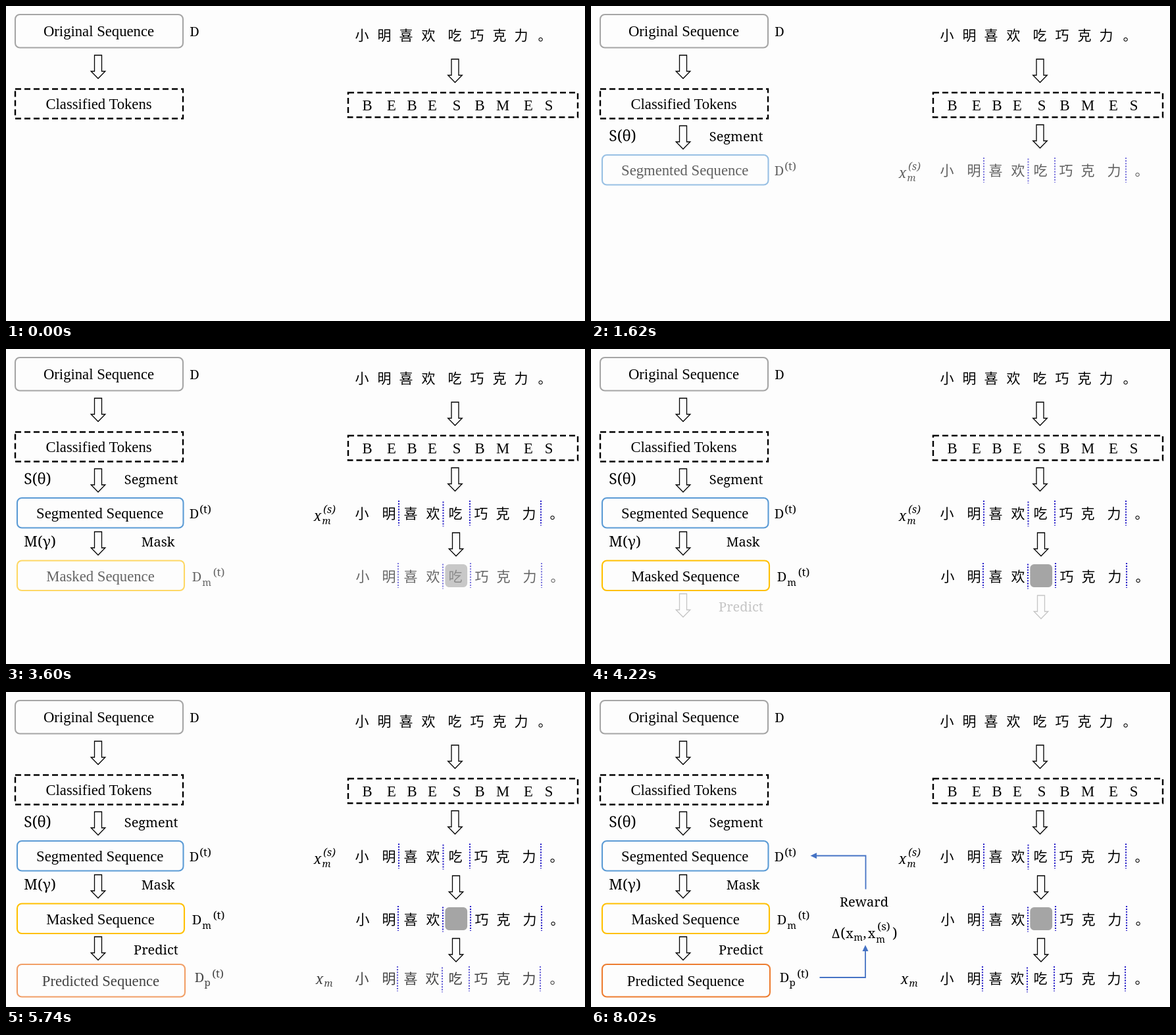
Recreate the animation shown at these times as an HTML page. Size 880 by 480 pixels, loop 8.05 s.

```html
<!DOCTYPE html>
<html lang="en">
<head>
<meta charset="utf-8">
<title>Segment, mask and predict</title>
<style>
  html, body { margin: 0; width: 880px; height: 480px; overflow: hidden; background: #fdfdfd; }
  svg { display: block; }
  text { text-anchor: middle; fill: #000; }
  .label { font: 22.7px "Liberation Serif", "Times New Roman", serif; }
  .math { font: 20px "Noto Serif", Cambria, serif; }
  .han { font: 300 21px "Noto Sans CJK SC", "Noto Sans CJK", sans-serif; }
  .arrow { fill: #fdfdfd; stroke: #000; stroke-width: 1.3; }
  .dash { fill: none; stroke: #000; stroke-width: 2.4; stroke-dasharray: 9 5; }
  .cut { stroke: #2a22c8; stroke-width: 2.1; stroke-dasharray: 2.06 2.06; }
  .wire { fill: none; stroke: #4472c4; stroke-width: 1.8; }
  .tip { fill: #4472c4; }
</style>
</head>
<body>
<svg id="stage" width="880" height="480" viewBox="0 0 880 480"></svg>
<script>
const LOOP = 8050;
const FADE = 1000;
const stage = document.getElementById("stage");

function add(parent, tag, attrs, content) {
  const el = document.createElementNS("http://www.w3.org/2000/svg", tag);
  for (const key in attrs) el.setAttribute(key, attrs[key]);
  if (content) el.textContent = content;
  return parent.appendChild(el);
}

function text(parent, kind, x, y, content, size, italic) {
  const el = add(parent, "text", { class: kind, x, y }, content);
  if (size) el.style.fontSize = size + "px";
  if (italic) el.style.fontStyle = "italic";
}

const math = (g, x, y, content, size, italic) => text(g, "math", x, y, content, size, italic);

function box(g, x, y, width, height, stroke, title, baseline) {
  add(g, "rect", { x, y, width, height, rx: 7, fill: "#fdfdfd", stroke, "stroke-width": 2.1 });
  text(g, "label", x + width / 2 - 0.5, baseline, title);
}

function arrow(g, x, y) {
  add(g, "path", {
    class: "arrow",
    d: `M${x - 5.5} ${y}h11v24.5h5.3l-10.8 11l-10.8 -11h5.3z`
  });
}

function sentence(g, baseline, xs) {
  [..."小明喜欢吃巧克力。"].forEach((c, i) => text(g, "han", xs[i], baseline, c));
}

function cuts(g, y, xs) {
  xs.forEach((x, i) => {
    const top = y + (i === 1 ? 1.5 : 0);
    add(g, "line", { class: "cut", x1: x, y1: top, x2: x, y2: top + 38 });
  });
}

// Always visible
const base = add(stage, "g");
box(base, 14, 13, 255, 50.5, "#a5a5a5", "Original Sequence", 46);
math(base, 286.5, 46, "D");
arrow(base, 140, 75);
add(base, "rect", { class: "dash", x: 14, y: 126.5, width: 255, height: 45 });
text(base, "label", 141, 157, "Classified Tokens");
sentence(base, 52, [541, 575, 608, 642, 682, 716, 750, 783, 819]);
arrow(base, 682.5, 81);
add(base, "rect", { class: "dash", x: 520, y: 132, width: 349, height: 37.5 });
const tagX = [549, 586, 617, 648, 685, 720, 755, 794, 825];
[..."BEBESBMES"].forEach((c, i) => text(base, "label", tagX[i], 159, c));

// Each step fades in after the one before it
const steps = [
  g => {
    math(g, 48, 206, "S(θ)", 22.8);
    arrow(g, 140, 182.5);
    math(g, 220.7, 205.5, "Segment");
    arrow(g, 682.5, 181);
  },
  g => {
    box(g, 17, 227, 252.5, 45.5, "#5b9bd5", "Segmented Sequence", 258);
    math(g, 286, 258, "D");
    math(g, 303, 250, "(t)", 17);
    math(g, 473.5, 262, "x", 21, true);
    math(g, 487, 267, "m", 14.5, true);
    math(g, 491.5, 249.5, "(s)", 16, true);
    sentence(g, 258, [541, 582, 615, 649, 683, 722, 755, 795, 837]);
    cuts(g, 231, [597, 664.5, 705, 813]);
  },
  g => {
    math(g, 51.5, 300.5, "M(γ)", 22);
    arrow(g, 140, 278.5);
    math(g, 231, 301, "Mask");
    arrow(g, 684, 280);
  },
  g => {
    box(g, 17, 322.5, 254, 45.5, "#ffc000", "Masked Sequence", 354);
    math(g, 290, 354, "D");
    math(g, 305, 360.5, "m", 14.5);
    math(g, 323.5, 346, "(t)", 17);
    sentence(g, 354, [542, 582, 615, 649, 683, 723, 756, 796, 838]);
    cuts(g, 326, [596, 664, 706, 814]);
  },
  g => {
    arrow(g, 140, 373);
    math(g, 228, 399.5, "Predict");
    arrow(g, 684, 375.5);
  },
  g => {
    box(g, 17, 415, 255, 49.5, "#ed7d31", "Predicted Sequence", 447.5);
    math(g, 294, 442, "D");
    math(g, 306, 447.5, "p", 15);
    math(g, 322, 434.5, "(t)", 17);
    math(g, 476.5, 445, "x", 21, true);
    math(g, 490, 449, "m", 14.5, true);
    sentence(g, 444, [541, 582, 615, 648, 683, 722, 756, 795, 837]);
    cuts(g, 418, [595, 663, 704, 812]);
  },
  g => {
    add(g, "path", { class: "wire", d: "M417.5 300.5V249.5H341" });
    add(g, "path", { class: "tip", d: "M333.5 249.5l9.5 -4.5v9z" });
    math(g, 415, 327, "Reward");
    math(g, 372, 375, "Δ");
    math(g, 383, 375, "(", 21);
    math(g, 393, 375, "x");
    math(g, 406, 379, "m", 14.5);
    math(g, 416, 375, ",");
    math(g, 426.5, 375, "x");
    math(g, 440, 382, "m", 14.5);
    math(g, 445, 363, "(s)", 17);
    math(g, 462, 375, ")", 21);
    add(g, "path", { class: "wire", d: "M347.5 435H417V393" });
    add(g, "path", { class: "tip", d: "M417 385.5l-4.5 9.5h9z" });
  }
];

function fadeIn(el, start) {
  el.animate([
    { opacity: 0, offset: 0 },
    { opacity: 0, offset: start / LOOP },
    { opacity: 1, offset: (start + FADE) / LOOP },
    { opacity: 1, offset: 1 }
  ], { duration: LOOP, iterations: Infinity });
}

steps.forEach((draw, i) => {
  const g = add(stage, "g");
  draw(g);
  fadeIn(g, i * FADE);
});

// The cover fades on its own, so the character shows through it at first
const cover = add(stage, "rect", {
  x: 668, y: 328.5, width: 32.5, height: 34, rx: 5.5,
  fill: "#a5a5a5", stroke: "#a5a5a5", "stroke-width": 1.2
});
fadeIn(cover, 3 * FADE);
</script>
</body>
</html>
```
